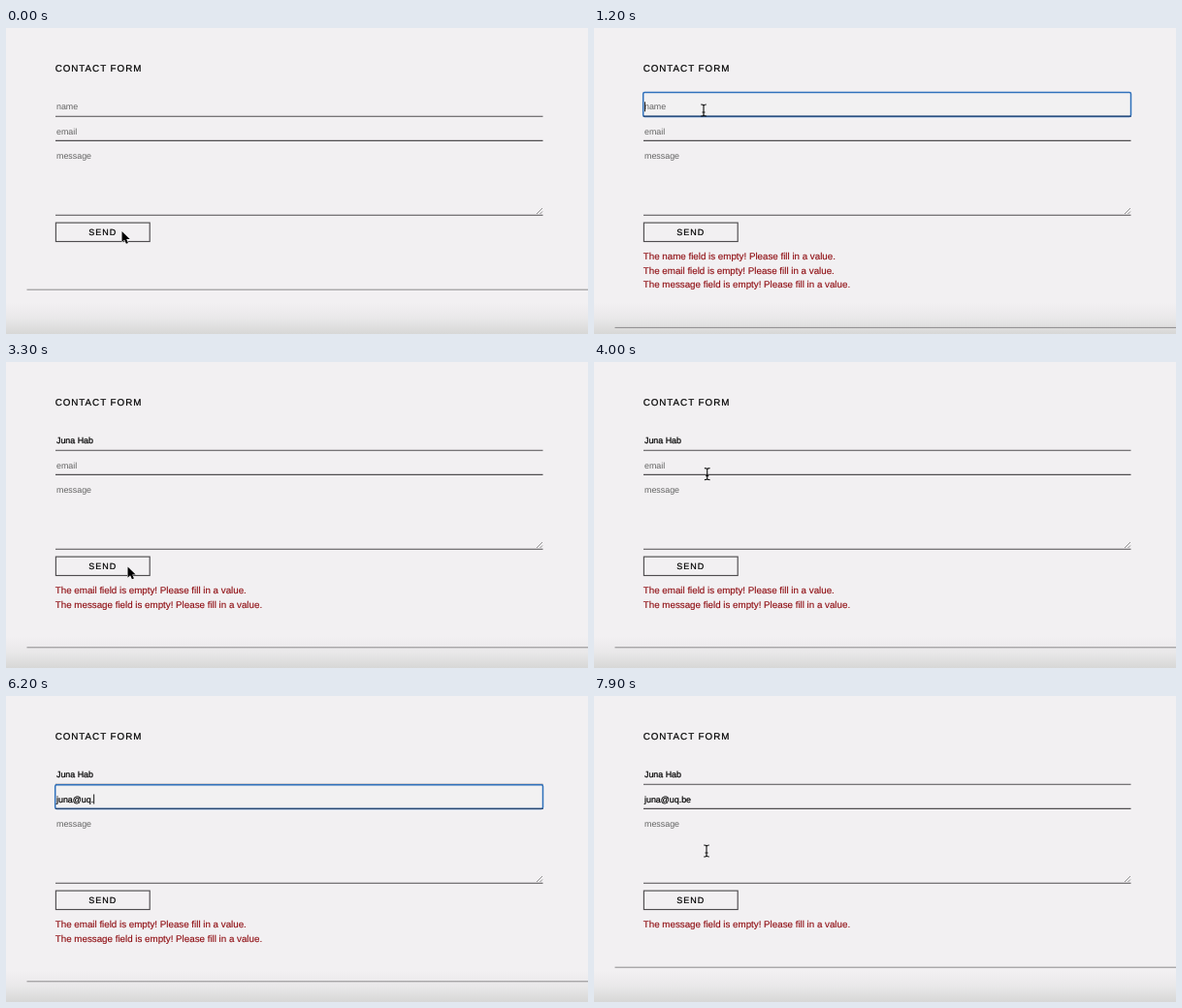
An HTML page for the animation above (8000 ms loop, 600 by 316 pixels).

```html
<!DOCTYPE html>
<html lang="en">
<head>
<meta charset="utf-8">
<title>Contact form</title>
<style>
  html, body { margin: 0; height: 100%; overflow: hidden; background: #f2f0f2; }
  svg { display: block; width: 100vw; height: 100vh; }
  text { font: 8.9px "Liberation Sans", Arial, sans-serif; text-rendering: geometricPrecision;
         white-space: pre; stroke: #000; stroke-width: .22; }
  .title { font-size: 9.8px; letter-spacing: .97px; }
  .send { font-size: 9px; letter-spacing: 1px; }
  .hint { fill: #626262; stroke: none; }
  .error { font-size: 9.78px; fill: #8e0b10; stroke: #8e0b10; stroke-width: .12; }
  .line { fill: none; stroke: #4f4d4f; stroke-width: 1.15; }
</style>
</head>
<body>
<svg viewBox="0 0 600 316">
  <defs>
    <linearGradient id="shade" x2="0" y2="1">
      <stop stop-color="#f2f0f2"/>
      <stop offset=".5" stop-color="#e9e8e9"/>
      <stop offset="1" stop-color="#d7d7d6"/>
    </linearGradient>
  </defs>
  <rect width="600" height="316" fill="#f2f0f2"/>
  <rect y="284" width="600" height="32" fill="url(#shade)"/>
  <path id="rule" d="M21.5 0H600" stroke="#8c8a8c"/>

  <text class="title" x="50.7" y="45.2">CONTACT FORM</text>
  <path class="line" d="M51 91.2H553.5M51 116.4H553.5M51 193.2H553.5"/>
  <path d="M547 192L553 186M550.5 192L553 189.5" stroke="#777" stroke-width=".8"/>
  <g id="ring">
    <rect x="50.7" width="502.8" height="24.8" rx="1.5" fill="#f2f1f2" stroke="#2f70bb" stroke-width="1.5"/>
    <path d="M51 24.6H553.5" stroke="#28466f" stroke-width="1.3"/>
  </g>
  <text id="name" x="52" y="84.3"/>
  <text id="email" x="52" y="109.5"/>
  <text class="hint" x="52" y="135">message</text>
  <path id="caret" d="M0-8V2" stroke="#000" stroke-width=".9"/>

  <rect class="line" x="51.4" y="201.1" width="96.8" height="19.4"/>
  <text class="send" x="85.3" y="214">SEND</text>
  <g id="errors"></g>

  <path id="arrow" d="M0 0V11.2L2.6 8.8L4.4 12.8L6.4 11.9L4.7 8H8.2Z"
        stroke="#fff" paint-order="stroke"/>
  <path id="beam" d="M-2.8-6Q0-6 0-4.6Q0-6 2.8-6M0-4.6V4.6M-2.8 6Q0 6 0 4.6Q0 6 2.8 6M-1.5 2H1.5"
        fill="none" stroke="#111" stroke-width="1.1"/>
</svg>
<script>
const $ = id => document.getElementById(id);
const show = (el, on) => el.style.display = on ? "" : "none";
const place = (el, x, y) => el.setAttribute("transform", `translate(${x} ${y})`);
const clamp = (v, lo, hi) => Math.min(hi, Math.max(lo, v));

const LOOP = 8000, STEP = 100, ROW = 25.2, ERROR_ROW = 14.6;
const clicks = [500, 3200, 7400];

// Typing starts at `start`, one letter every `pace` ms
const fields = [
  { id: "name", value: "Juna Hab", focus: 1200, blur: clicks[1], start: 1700, pace: 114 },
  { id: "email", value: "juna@uq.be", focus: 4100, blur: clicks[2], start: 5000, pace: 170 }
];

const send = [119.5, 210], sendEdge = [125.5, 211.5];
const name = [113, 85], email = [116, 108], message = [116, 160];
const moves = [
  { from: send, to: name, start: 500, end: 1000 },
  { from: [136, 154], to: sendEdge, start: 2700, end: 3100 },
  { from: sendEdge, to: email, start: 3500, end: 4100 },
  { from: [136, 154], to: send, start: 6900, end: 7200 },
  { from: send, to: message, start: 7400, end: 7900 }
];

// The pointer hides on typing until it moves again
function pointerAt(t) {
  const m = moves.findLast(m => m.start <= t) ?? moves[0];
  if (fields.some(f => f.start >= m.start && f.start <= t)) return null;
  const u = clamp((t - m.start) / (m.end - m.start), 0, 1), k = u * u * (3 - 2 * u);
  return m.from.map((v, i) => v + (m.to[i] - v) * k);
}

function drawField(f, row, t) {
  const el = $(f.id);
  const typed = clamp(Math.floor((t - f.start) / f.pace) + 1, 0, f.value.length);
  el.textContent = typed ? f.value.slice(0, typed) : f.id;
  el.setAttribute("class", typed ? "" : "hint");
  if (t < f.focus || t >= f.blur) return;

  const since = typed ? f.start + (typed - 1) * f.pace : f.focus;
  show($("ring"), true);
  show($("caret"), (t - since) % 1000 < 500);
  place($("ring"), 0, 66.6 + ROW * row);
  place($("caret"), 52.5 + (typed ? el.getComputedTextLength() : 0), 84.3 + ROW * row);
}

function drawErrors(t) {
  const sent = clicks.filter(c => c <= t).length;
  const missing = sent ? ["name", "email", "message"].slice(sent - 1) : [];
  $("errors").innerHTML = missing.map((n, i) =>
    `<text class="error" x="50.8" y="${239.2 + ERROR_ROW * i}">The ${n} field is empty! Please fill in a value.</text>`
  ).join("");
  place($("rule"), 0, sent ? 280.2 + ERROR_ROW * (missing.length - 1) : 270.2);
}

function draw(t) {
  show($("ring"), false);
  show($("caret"), false);
  fields.forEach((f, row) => drawField(f, row, t));
  drawErrors(t);
  const p = pointerAt(t), overText = p && p[1] < 194;
  show($("arrow"), p && !overText);
  show($("beam"), overText);
  if (p) place($(overText ? "beam" : "arrow"), ...p);
}

function tick() {
  draw(Math.floor(performance.now() % LOOP / STEP) * STEP);
  requestAnimationFrame(tick);
}
tick();
</script>
</body>
</html>
```
